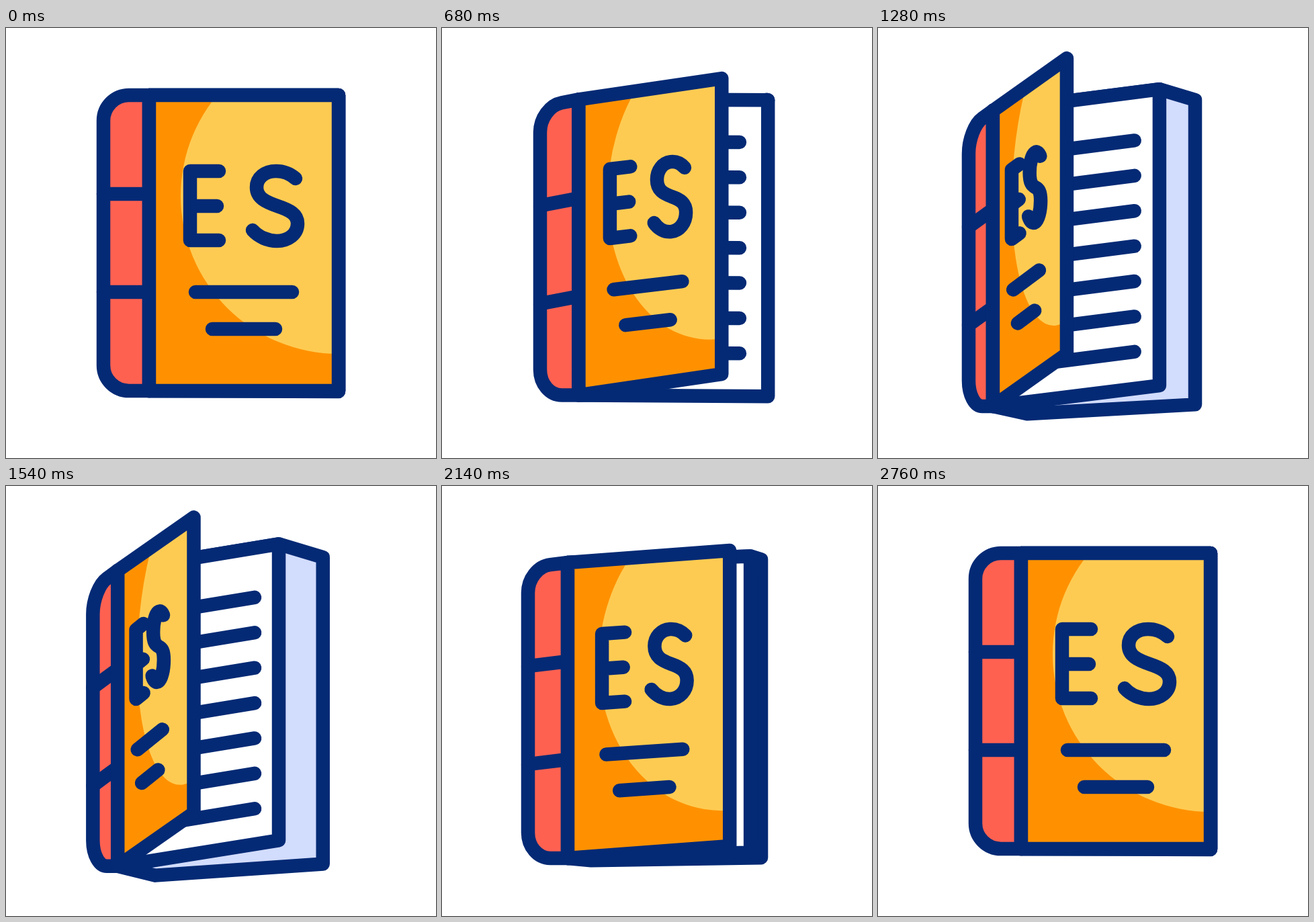
Write an HTML page with a canvas that moves like this. It is 640 px wide and 640 px high and loops after 3.6 s.

```html
<!DOCTYPE html>
<html lang="en">
<head>
<meta charset="utf-8">
<title>Opening book</title>
<style>
  html, body { margin: 0; height: 100%; overflow: hidden; background: #fff; }
  canvas { display: block; width: 100%; height: 100%; }
</style>
</head>
<body>
<canvas id="stage" width="640" height="640"></canvas>
<script>
const ctx = document.getElementById('stage').getContext('2d');
const NAVY = '#042a75', RED = '#ff6151', ORANGE = '#ff9100', YELLOW = '#fecb52', PALE = '#d2dcfd';
const LOOP = 3600, HEIGHT = 440;

// Key times in ms, and the value of each moving measure at those times
const times = [320, 480, 880, 1280, 1460, 1800, 1940, 2140, 2460, 2760];
const tracks = {
  left:     [145, 145, 147, 135, 129.5, 129, 126, 128, 137, 145],
  hinge:    [213, 211, 193, 171, 166, 169, 174, 187, 204, 213],
  hingeTop: [100, 101.5, 112.5, 123, 126, 124, 121, 114, 106, 100],
  edge:     [495, 478, 349, 281, 275, 327, 368, 428, 482, 495],
  edgeTop:  [100, 96, 54.5, 45, 44.5, 67, 81, 96, 99.5, 100],
  page:     [495, 493, 472, 419, 405, 418, 434, 459, 488, 495],
  back:     [495, 493, 475, 472, 472, 470, 471, 475, 489, 495],
  textX:    [274, 268, 229, 199, 193, 200.5, 212, 238, 264, 274],
  textY:    [213, 213, 207, 211, 213.5, 215, 217.5, 220, 218, 213],
  squeeze:  [1, .944, .46, .27, .25, .36, .53, .79, .98, 1],
  skew:     [0, .021, .147, .2, .21, .18, .12, .055, .005, 0]
};

const label = new Path2D(
  'M43 0H0V103H43M0 52H40' +
  'M157 11C149 4 139 0 128 0C111 0 99 10 99 24C99 40 113 46 130 52' +
  'C148 58 160 64 160 78C160 94 146 104 129 104C116 104 102 98 93 88' +
  'M8 180H152M33 235H127');

// Monotone cubic interpolation, at rest at both ends
function sample(values, t) {
  const last = times.length - 1;
  if (t <= times[0]) return values[0];
  if (t >= times[last]) return values[last];
  const rate = i => (values[i + 1] - values[i]) / (times[i + 1] - times[i]);
  const tangent = i => {
    if (i === 0 || i === last) return 0;
    const a = rate(i - 1), b = rate(i);
    return a * b <= 0 ? 0 : 2 * a * b / (a + b);
  };
  const i = times.findIndex(time => time > t) - 1;
  const span = times[i + 1] - times[i], s = (t - times[i]) / span;
  const ease = s * s * (3 - 2 * s);
  return values[i] + (values[i + 1] - values[i]) * ease +
    span * s * (1 - s) * ((1 - s) * tangent(i) - s * tangent(i + 1));
}

function polygon(...points) {
  const path = new Path2D();
  points.forEach(([x, y]) => path.lineTo(x, y));
  path.closePath();
  return path;
}

function paint(path, fill) {
  if (fill) {
    ctx.fillStyle = fill;
    ctx.fill(path);
  }
  ctx.stroke(path);
}

function line(x1, y1, x2, y2) {
  ctx.beginPath();
  ctx.moveTo(x1, y1);
  ctx.lineTo(x2, y2);
  ctx.stroke();
}

function drawPages(p) {
  const { hinge, hingeTop, page, back } = p;
  const bottom = hingeTop + HEIGHT;
  const gap = back - page;
  const pageTop = hingeTop - .6 * gap;
  const backBottom = bottom - .05 * gap;
  const backTop = backBottom - HEIGHT - .25 * gap;

  paint(polygon([hinge, hingeTop], [page, pageTop], [back, backTop],
    [back, backBottom], [222, bottom + .21 * gap], [hinge, bottom]), PALE);
  paint(polygon([hinge, hingeTop], [page, pageTop],
    [page, pageTop + HEIGHT + 1], [hinge, bottom]), '#fff');

  const reach = .85;
  for (let i = 0; i < 7; i++) {
    const y = hingeTop + 63 + .16 * gap + 52.4 * i;
    line(hinge, y, hinge + (page - hinge) * reach, y + (pageTop - hingeTop) * reach);
  }
}

function drawSpine(p) {
  const { left, hinge, hingeTop, skew } = p;
  const bottom = hingeTop + HEIGHT;
  const leftTop = hingeTop + 130 * skew;
  const along = f => [left + (hinge - left) * f, leftTop + (hingeTop - leftTop) * f];
  const [cornerX, cornerY] = along(.56), [bendX, bendY] = along(.25);

  const spine = new Path2D();
  spine.moveTo(hinge, hingeTop);
  spine.lineTo(cornerX, cornerY);
  spine.bezierCurveTo(bendX, bendY, left, leftTop + 17, left, leftTop + 38);
  spine.lineTo(left, bottom - 38);
  spine.bezierCurveTo(left, bottom - 17, bendX, bottom, cornerX, bottom);
  spine.lineTo(hinge, bottom);
  spine.closePath();
  paint(spine, RED);
  for (const y of [147, 293]) line(left, leftTop + y, hinge, hingeTop + y);
}

function drawCover(p) {
  const { hinge, hingeTop, edge, edgeTop, textX, textY, squeeze, skew } = p;
  const cover = polygon([hinge, hingeTop], [edge, edgeTop],
    [edge, edgeTop + HEIGHT], [hinge, hingeTop + HEIGHT]);
  ctx.fillStyle = ORANGE;
  ctx.fill(cover);

  ctx.save();
  ctx.clip(cover);
  ctx.transform((edge - hinge) / 282, (edgeTop - hingeTop) / 282, 0, 1, hinge, hingeTop);
  ctx.beginPath();
  ctx.ellipse(282, 150 + 8 * (1 - squeeze), 201 + 34 * squeeze, 235, 0, 0, 2 * Math.PI);
  ctx.fillStyle = YELLOW;
  ctx.fill();
  ctx.restore();
  paint(cover);

  // Only the outline is skewed; the pen keeps its width
  const text = new Path2D();
  text.addPath(label, new DOMMatrix([squeeze, -skew, 0, 1, textX, textY]));
  paint(text);
}

function frame(now) {
  const pose = {};
  for (const name in tracks) pose[name] = sample(tracks[name], now % LOOP);
  ctx.fillStyle = '#fff';
  ctx.fillRect(0, 0, 640, 640);
  ctx.strokeStyle = NAVY;
  ctx.lineWidth = 20.5;
  ctx.lineCap = ctx.lineJoin = 'round';
  drawPages(pose);
  drawSpine(pose);
  drawCover(pose);
  requestAnimationFrame(frame);
}
requestAnimationFrame(frame);
</script>
</body>
</html>
```
